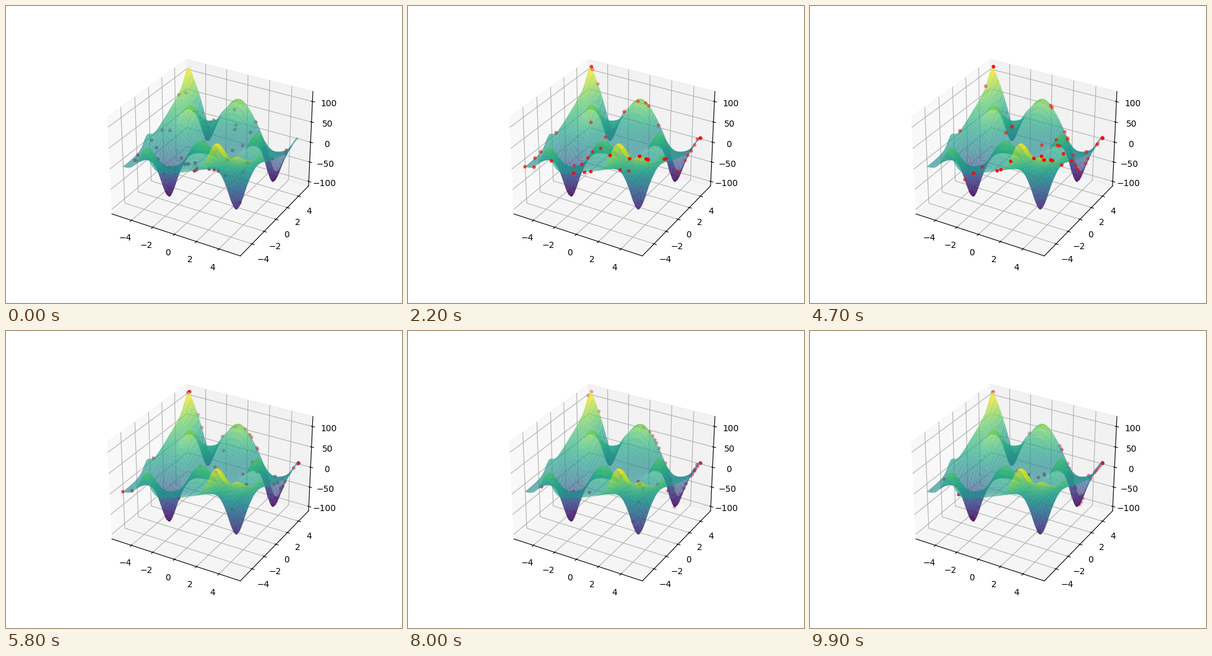
Animation, 640 px wide and 480 px high, one loop 10 s. Source, as a matplotlib script:

```python
import numpy as np
import matplotlib.pyplot as plt
from matplotlib.animation import FuncAnimation

BOUND = 5.12
SWARM = 50
FRAMES = 100
INTERVAL = 100
INERTIA, PULL = 0.7, 2.0


def bird(x, y):
    return (np.sin(y) * np.exp((1 - np.cos(x)) ** 2)
            + np.cos(x) * np.exp((1 - np.sin(y)) ** 2)
            + (x - y) ** 2)


def run_swarm(seed=7):
    """Particle swarm in which each coordinate follows a random peer's best."""
    rng = np.random.default_rng(seed)
    pos = rng.uniform(-BOUND, BOUND, (SWARM, 2))
    vel = rng.uniform(-1, 1, (SWARM, 2))
    best, best_val = pos.copy(), bird(*pos.T)
    steps = [pos.copy()]
    for _ in range(FRAMES - 1):
        peer = best[rng.integers(SWARM, size=(SWARM, 2)), [0, 1]]
        r1, r2 = rng.random((2, SWARM, 2))
        vel = INERTIA * vel + PULL * (r1 * (best - pos) + r2 * (peer - pos))
        pos = np.clip(pos + vel, -BOUND, BOUND)
        val = bird(*pos.T)
        better = val < best_val
        best[better], best_val[better] = pos[better], val[better]
        steps.append(pos.copy())
    return steps


steps = run_swarm()

fig = plt.figure(figsize=(6.4, 4.8), dpi=100)
ax = fig.add_subplot(projection="3d", computed_zorder=False)

axis = np.linspace(-BOUND, BOUND, 100)
X, Y = np.meshgrid(axis, axis)
Z = bird(X, Y)
ax.plot_surface(X, Y, Z, cmap="viridis", alpha=0.7, zorder=2)

side = BOUND * 1.1 * 25 / 24
pad = np.ptp(Z) / 48
ax.set_xlim(-side, side)
ax.set_ylim(-side, side)
ax.set_zlim(Z.min() - pad, Z.max() + pad)

dots = None


def update(i):
    global dots
    if dots is not None:
        dots.remove()
    x, y = steps[i].T
    # A dot on the nearest corner brings the whole swarm in front.
    in_front = np.any((x >= BOUND) & (y <= -BOUND))
    dots = ax.scatter(x, y, bird(x, y), s=10,
                      color="red" if in_front else (0.8, 0.08, 0.26),
                      zorder=3 if in_front else 1)
    return (dots,)


anim = FuncAnimation(fig, update, frames=FRAMES, interval=INTERVAL,
                     repeat=True, repeat_delay=0, blit=False)
plt.show()
```
